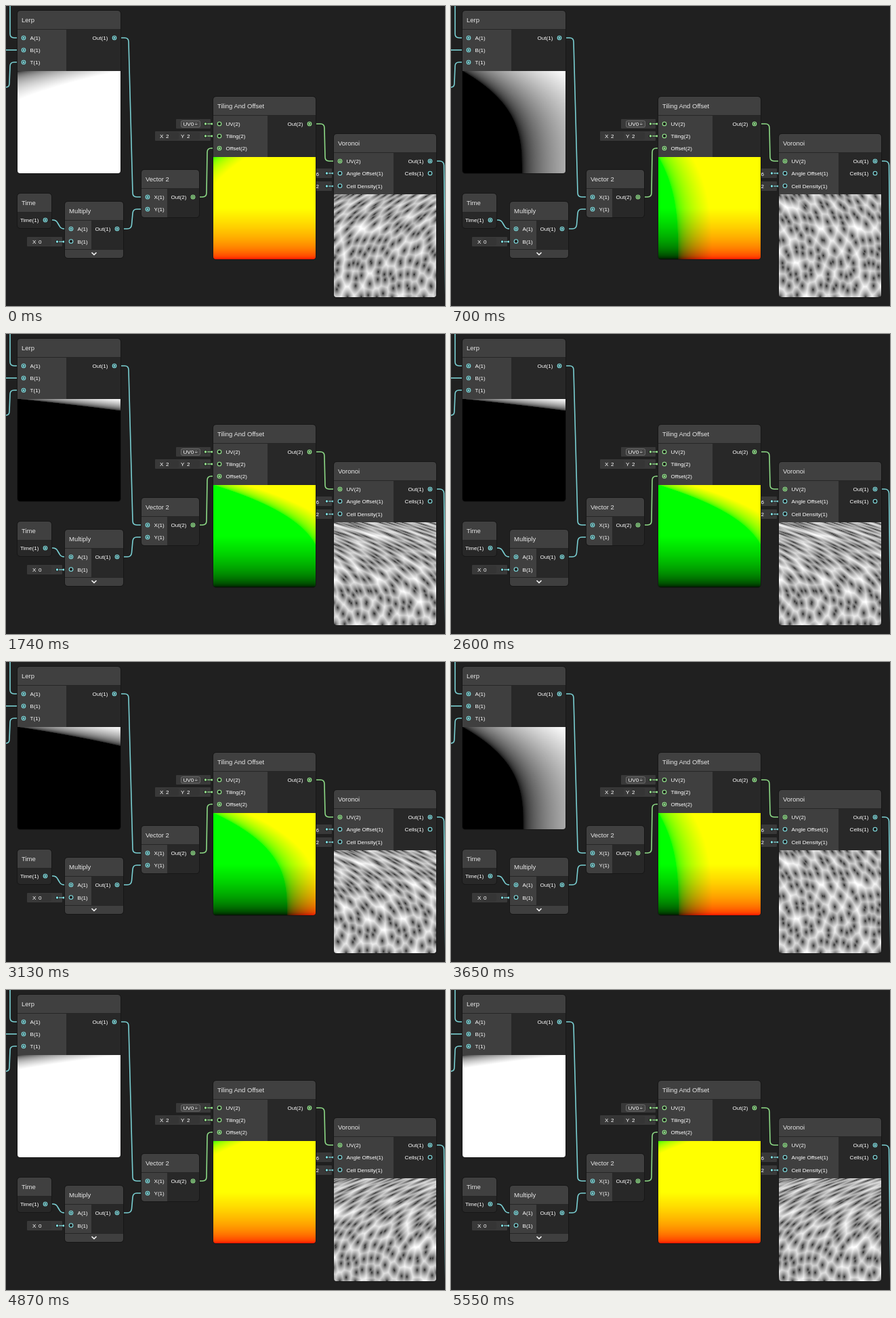
Write an HTML page with a canvas that moves like this. It is 648 px wide and 443 px high and loops after 5.65 s.

```html
<!DOCTYPE html>
<html lang="en">
<head>
<meta charset="utf-8">
<title>Shader graph</title>
<style>
  html, body { margin: 0; width: 100%; height: 100%; overflow: hidden; background: #202020; }
  svg, canvas { position: absolute; left: 0; top: 0; display: block; }
  canvas { border-radius: 0 0 4px 4px; }
  text { font: 8.1px "Liberation Sans", Arial, sans-serif; fill: #fff; white-space: pre; }
  .title { font-size: 9.5px; fill: #e6e6e6; }
</style>
</head>
<body>
<svg id="graph" width="648" height="443" viewBox="0 0 648 443"></svg>
<script>
const TEAL = '#84e4e7', GREEN = '#9aef92';
const LOOP = 5650, STEPS = 65;
const CELL_DENSITY = 4.52, ANGLE_OFFSET = 3.46;

// ---------- Static graph ----------
const rect = (x, y, w, h, fill, extra = '') =>
  `<rect x="${x}" y="${y}" width="${w}" height="${h}" fill="${fill}" ${extra}/>`;
const label = (x, y, text, extra = '') => `<text x="${x}" y="${y}" ${extra}>${text}</text>`;
const dot = (x, y, r, fill, extra = '') => `<circle cx="${x}" cy="${y}" r="${r}" fill="${fill}" ${extra}/>`;
const wire = (d, color) => `<path d="${d}" fill="none" stroke="${color}" stroke-width="1.6" opacity=".9"/>`;

function port(x, y, color, linked) {
  return dot(x, y, 2.8, '#1d1d1d', `stroke="${color}" stroke-width="1.1"`) +
    (linked ? dot(x, y, 1.5, color) : '');
}

// Inputs and outputs: [text, y of the port, color, linked]
function node({ x, y, w, h, title, head = 27, split, bodyHeight, inputs = [], outputs = [], footer }) {
  const bodyTop = y + head, clip = `clip-${x}-${y}`;
  let s = `<clipPath id="${clip}">${rect(x, y, w, h, '#000', 'rx="4"')}</clipPath><g clip-path="url(#${clip})">` +
    rect(x, y, w, h, '#282828') +
    rect(x, y, w, head, '#404040') +
    rect(x, bodyTop, split - x, bodyHeight, '#3f3f3f') +
    rect(x, bodyTop, w, 1, '#262626') +
    (footer ? rect(x, y + h - 12, w, 12, '#3f3f3f') + rect(x, y + h - 13, w, 1, '#262626') : '') +
    '</g>' + rect(x - .5, y - .5, w + 1, h + 1, 'none', 'rx="4.5" stroke="#171717"') +
    label(x + 6, y + 17, title, 'class="title"');
  for (const [text, py, color, linked] of inputs)
    s += port(x + 9, py, color, linked) + label(x + 18.5, py + 3, text);
  for (const [text, py, color, linked] of outputs)
    s += port(x + w - 9, py, color, linked) + label(x + w - 18.5, py + 3, text, 'text-anchor="end"');
  if (footer)
    s += `<path d="M${x + 39.5} ${y + h - 8}l3.5 3.4l3.5-3.4" fill="none" stroke="#eee" stroke-width="1.7"/>`;
  return s;
}

// Default-value box with its connector to the port at portX
function valueBox(x, right, y, portX, color, content) {
  return rect(x, y - 7, right - x, 14, '#393939', 'rx="1"') +
    `<path d="M${right - 8} ${y}H${portX}" stroke="${color}" stroke-width="1.1"/>` +
    dot(right - 7.5, y, 2.6, '#1d1d1d') + dot(right - 7.5, y, 1.7, color) +
    dot(right + 2, y, 1.5, color) + content;
}
const field = (x, y, name, value) =>
  rect(x + 8, y - 5.5, 20, 11, '#353535', 'rx="2"') + label(x, y + 3, name) + label(x + 9, y + 3, value);

document.getElementById('graph').innerHTML = [
  wire('M6 0V41Q6 47 12 47H26', TEAL),
  wire('M0 65H26', TEAL),
  wire('M0 120Q5 120 5 114L6 89Q6 83 12 83H26', TEAL),
  wire('M160 47H175Q181 47 181 53L187 276Q187 282 193 282H209', TEAL),
  wire('M58 316H69Q74 316 76 320L79 325Q81 329 86 329H96', TEAL),
  wire('M164 329H179Q185 329 185.5 323L187 306Q187.5 300 193 300H209', TEAL),
  wire('M276 282H290Q296 282 296 276L297 216Q297 210 303 210H315', GREEN),
  wire('M449 174H464Q470 174 470 180L471 223Q471 229 477 229H493', GREEN),
  wire('M626 229H640Q646 229 646.5 235L649 443', TEAL),

  valueBox(251, 302, 174, 315, GREEN,
    rect(258.5, 169.5, 28, 9.5, '#444', 'rx="2" stroke="#777" stroke-width=".8"') +
    label(261.5, 177, 'UV0') + label(278.5, 177, '÷')),
  valueBox(220, 302, 192, 315, GREEN, field(227, 192, 'X', '2') + field(258, 192, 'Y', '2')),
  valueBox(31, 83, 348, 96, TEAL, field(39, 348, 'X', '0')),
  valueBox(420, 481, 247, 493, TEAL, label(457.5, 250.5, '6')),
  valueBox(420, 481, 266, 493, TEAL, label(457.5, 269, '2')),

  node({ x: 17, y: 7, w: 152, h: 240, title: 'Lerp', split: 89, bodyHeight: 62,
    inputs: [['A(1)', 47, TEAL, 1], ['B(1)', 65, TEAL, 1], ['T(1)', 83, TEAL, 1]],
    outputs: [['Out(1)', 47, TEAL, 1]] }),
  node({ x: 17, y: 277, w: 50, h: 51, title: 'Time', split: 17, bodyHeight: 24,
    outputs: [['Time(1)', 316, TEAL, 1]] }),
  node({ x: 87, y: 289, w: 86, h: 83, title: 'Multiply', split: 126, bodyHeight: 44, footer: true,
    inputs: [['A(1)', 329, TEAL, 1], ['B(1)', 347.5, TEAL, 0]],
    outputs: [['Out(1)', 329, TEAL, 1]] }),
  node({ x: 200, y: 242, w: 85, h: 70, title: 'Vector 2', split: 238, bodyHeight: 43,
    inputs: [['X(1)', 282, TEAL, 1], ['Y(1)', 300, TEAL, 1]],
    outputs: [['Out(2)', 282, GREEN, 1]] }),
  node({ x: 306, y: 134, w: 151, h: 240, title: 'Tiling And Offset', split: 386, bodyHeight: 62,
    inputs: [['UV(2)', 174, GREEN, 0], ['Tiling(2)', 192, GREEN, 0], ['Offset(2)', 210, GREEN, 1]],
    outputs: [['Out(2)', 174, GREEN, 1]] }),
  node({ x: 484, y: 189, w: 151, h: 241, title: 'Voronoi', split: 572, bodyHeight: 62,
    inputs: [['UV(2)', 229, GREEN, 1], ['Angle Offset(1)', 247, TEAL, 0], ['Cell Density(1)', 265.5, TEAL, 0]],
    outputs: [['Out(1)', 229, TEAL, 1], ['Cells(1)', 247, TEAL, 0]] }),
].join('');

// ---------- Shader previews ----------
const clamp = v => Math.min(1, Math.max(0, v));
const toDisplay = v => 255 * Math.pow(clamp(v), 1 / 2.2);
const fract = v => v - Math.floor(v);

const cellCache = new Map();
function cellPoint(x, y) {
  const key = x * 1000 + y;
  let p = cellCache.get(key);
  if (!p) {
    const hx = fract(Math.sin(x * 15.27 + y * 99.41) * 46839.32);
    const hy = fract(Math.sin(x * 47.63 + y * 89.98) * 46839.32);
    p = [x + Math.sin(hy * ANGLE_OFFSET) * .5 + .5, y + Math.cos(hx * ANGLE_OFFSET) * .5 + .5];
    cellCache.set(key, p);
  }
  return p;
}

function voronoi(x, y) {
  x *= CELL_DENSITY;
  y *= CELL_DENSITY;
  const cx = Math.floor(x), cy = Math.floor(y);
  let best = 64;
  for (let j = -1; j <= 1; j++)
    for (let i = -1; i <= 1; i++) {
      const [px, py] = cellPoint(cx + i, cy + j);
      best = Math.min(best, (px - x) ** 2 + (py - y) ** 2);
    }
  return Math.sqrt(best);
}

// The sway is pinned at the top edge and grows downwards
const lerp = (u, v, sway) => u + sway * (1 - v ** 3);
const gray = value => { const c = toDisplay(value); return [c, c, c]; };

function preview(x, y, w, h, shade) {
  const canvas = document.createElement('canvas');
  canvas.width = w;
  canvas.height = h;
  canvas.style.left = x + 'px';
  canvas.style.top = y + 'px';
  document.body.append(canvas);
  const ctx = canvas.getContext('2d'), image = ctx.createImageData(w, h);
  return sway => {
    let k = 0;
    for (let row = 0; row < h; row++)
      for (let col = 0; col < w; col++) {
        const [r, g, b] = shade((col + .5) / w, 1 - (row + .5) / h, sway);
        image.data[k++] = r;
        image.data[k++] = g;
        image.data[k++] = b;
        image.data[k++] = 255;
      }
    ctx.putImageData(image, 0, 0);
  };
}

const previews = [
  preview(17, 96, 152, 151, (u, v, s) => gray(lerp(u, v, s))),
  preview(306, 223, 151, 151, (u, v, s) => [toDisplay(2 * u + lerp(u, v, s)), toDisplay(2 * v), 0]),
  preview(484, 278, 151, 152, (u, v, s) => gray(voronoi(2 * u + lerp(u, v, s), 2 * v))),
];

// ---------- Playback ----------
const stepTime = LOOP / STEPS;
let shownStep = -1;

function frame() {
  const t = performance.now() % LOOP;
  const step = Math.min(STEPS - 1, Math.floor((t + 15) / stepTime));
  if (step !== shownStep) {
    shownStep = step;
    const seconds = step * stepTime / 1000;
    const sway = -.28 - 3.25 * Math.cos(seconds - 2.175);
    previews.forEach(draw => draw(sway));
  }
  requestAnimationFrame(frame);
}
frame();
</script>
</body>
</html>
```
